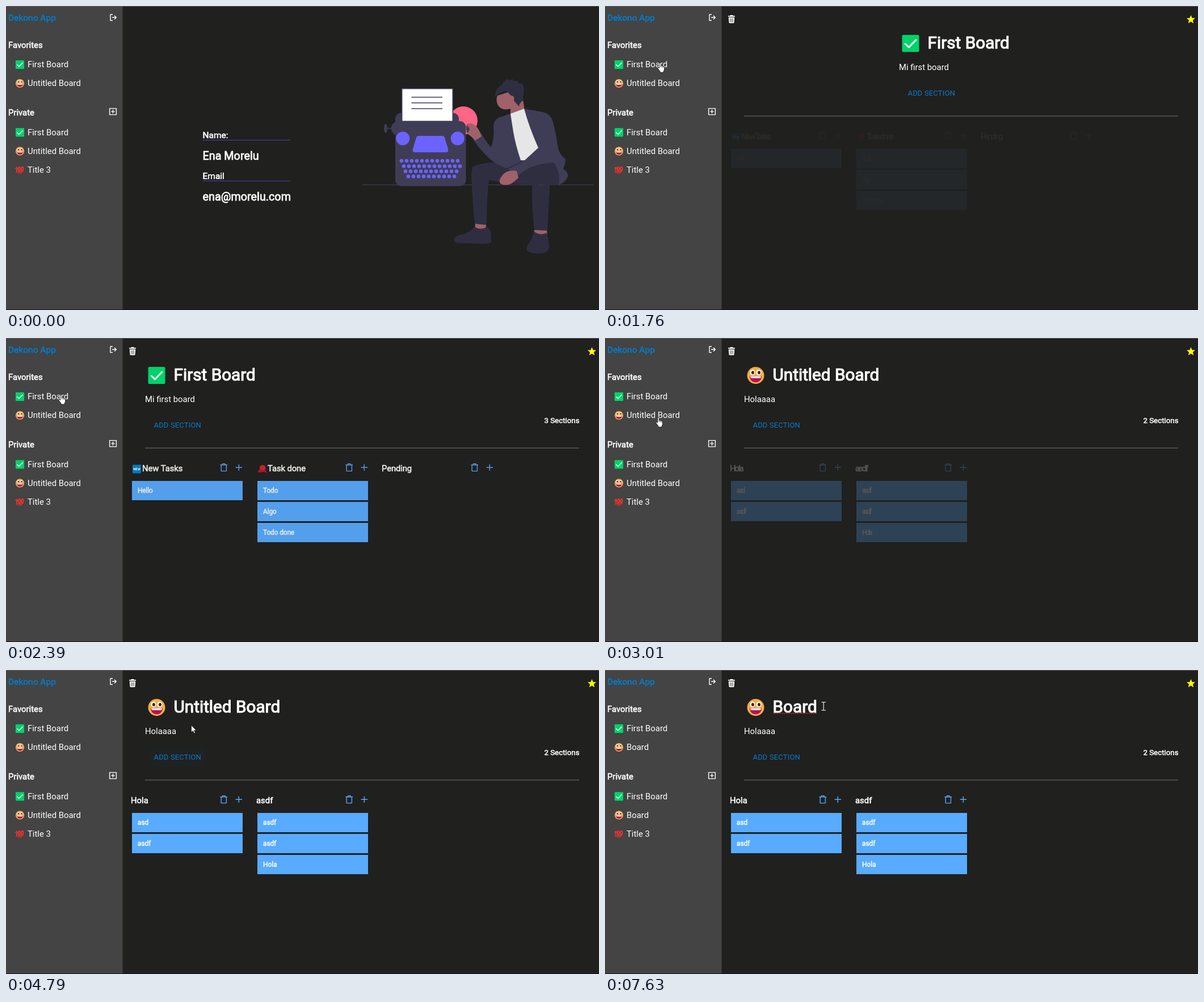
Write an HTML page with a canvas that moves like this. It is 1045 px wide and 536 px high and loops after 8 s.

```html
<!DOCTYPE html>
<html lang="en">
<head>
<meta charset="utf-8">
<title>Board app</title>
<style>
html, body { margin: 0; width: 100%; height: 100%; overflow: hidden; background: #20201f; }
canvas { display: block; }
</style>
</head>
<body>
<canvas id="stage" width="1045" height="536"></canvas>
<script>
const ctx = document.getElementById('stage').getContext('2d');
const LOOP = 8000;
const BG = [32, 32, 31], WHITE = [255, 255, 255], TILE = [88, 171, 255];
const INK = '#2f2e41', COAT = '#3f3d56', SKIN = '#a0616a', VIOLET = '#6c63ff', LINK = '#087ac8';

const clamp = v => Math.max(0, Math.min(1, v));
const outQuad = p => 1 - (1 - p) ** 2;
const outCubic = p => 1 - (1 - p) ** 3;
const mix = (c, a) => `rgb(${c.map((v, i) => Math.round(BG[i] + (v - BG[i]) * a))})`;

function text(s, x, y, size, { bold = false, color = '#fff', align = 'left', gap = 0 } = {}) {
  ctx.font = `400 ${size}px Roboto, sans-serif`;
  ctx.textAlign = align;
  ctx.letterSpacing = gap + 'px';
  ctx.fillStyle = ctx.strokeStyle = color;
  ctx.fillText(s, x, y);
  if (bold) {
    ctx.lineWidth = size / 26;
    ctx.lineJoin = 'round';
    ctx.strokeText(s, x, y);
  }
  ctx.letterSpacing = '0px';
}

function rect(x, y, w, h, color, r = 0) {
  ctx.fillStyle = color;
  ctx.beginPath();
  ctx.roundRect(x, y, w, h, r);
  ctx.fill();
}

function oval(x, y, rx, ry, color, turn = 0) {
  ctx.fillStyle = color;
  ctx.beginPath();
  ctx.ellipse(x, y, rx, ry, turn, 0, 7);
  ctx.fill();
}

function shape(d, color) {
  ctx.fillStyle = color;
  ctx.fill(new Path2D(d));
}

function line(d, color, width = 1) {
  ctx.strokeStyle = color;
  ctx.lineWidth = width;
  ctx.stroke(new Path2D(d));
}

function at(x, y, scale, draw) {
  ctx.save();
  ctx.translate(x, y);
  ctx.scale(scale, scale);
  draw();
  ctx.restore();
}

// Emoji are drawn inside a box from -1 to 1
const emoji = {
  check() {
    rect(-1, -1, 2, 2, '#00d26a', .14);
    ctx.lineCap = ctx.lineJoin = 'round';
    line('M-.62 .05L-.2 .45L.62 -.4', '#fff', .2);
    ctx.lineCap = 'butt';
  },
  grin() {
    oval(0, 0, 1, 1, '#f8ad3d');
    for (const x of [-.37, .37]) {
      oval(x, -.35, .3, .34, '#fff');
      oval(x + .03, -.34, .17, .2, '#40232b');
    }
    shape('M-.7 .08H.7C.68 .55 .4 .8 0 .8S-.68 .55 -.7 .08Z', '#b4125c');
    shape('M-.64 .1H.64L.56 .32H-.56Z', '#fff');
  },
  hundred() {
    ctx.lineCap = 'round';
    const red = '#f8312f';
    line('M-.95 -.35L-.62 -.55L-.75 .3', red, .25);
    for (const x of [-.13, .57]) {
      ctx.lineWidth = .24;
      ctx.beginPath();
      ctx.ellipse(x, -.22, .22, .43, .2, 0, 7);
      ctx.stroke();
    }
    line('M-.85 .58Q0 .35 .8 .32M-.35 .85Q0 .72 .5 .68', red, .17);
    ctx.lineCap = 'butt';
  },
  fresh() {
    rect(-1, -1, 2, 2, '#0084ce', .14);
    line('M-.72 .25V-.25L-.38 .25V-.25M.08 -.23H-.18V.23H.08M-.18 0H.06M.26 -.25L.38 .23L.5 -.1L.62 .23L.75 -.25', '#fff', .13);
  },
  bell() {
    oval(.1, -.25, .7, .72, '#d8202f');
    shape('M-1 .45L-.5 0L.9 .3L1 .9L.4 .65L-.9 .85Z', '#b01a2e');
  }
};

const icon = {
  exit: () => line('M188 15H184V25.5H188M187 20.2H194M191 17L194.3 20.2L191 23.5', '#fff', 1.4),
  addBox: () => line('M182.6 180.6H194.4V191.6H182.6ZM188.5 182.8V189.4M185.2 186.1H191.8', '#fff', 1.4),
  bin() {
    rect(217, 17.3, 12, 1.8, '#fff', .6);
    rect(220.5, 16, 5, 2, '#fff', .8);
    shape('M217.8 20H228.2L227.5 29Q227.4 30.2 226.3 30.2H219.7Q218.6 30.2 218.5 29Z', '#fff');
    line('M220.8 21.6V28.5M223 21.6V28.5M225.2 21.6V28.5', '#20201f', .8);
  },
  star() {
    ctx.beginPath();
    for (let i = 0; i < 10; i++) {
      const r = i % 2 ? 3.5 : 8, a = i * Math.PI / 5 - Math.PI / 2;
      ctx.lineTo(1032.5 + r * Math.cos(a), 24 + r * Math.sin(a));
    }
    ctx.fillStyle = '#ffff00';
    ctx.fill();
  }
};

function sidebar(boardName) {
  rect(0, 0, 205.5, 536, '#434443');
  text('Dekono App', 4, 26, 15.5, { bold: true, color: LINK });
  icon.exit();
  text('Favorites', 4, 74, 14.87, { bold: true });
  text('Private', 4, 193.3, 14.87, { bold: true });
  icon.addBox();
  const items = [['check', 'First Board', 103], ['grin', boardName, 136],
    ['check', 'First Board', 222.5], ['grin', boardName, 255.5], ['hundred', 'Title 3', 288.5]];
  for (const [face, name, y] of items) {
    at(24.5, y + .3, 7.6, emoji[face]);
    text(name, 38, y + 5.3, 14.87);
  }
}

function typewriter() {
  line('M628 315.3H1036', COAT, 1.3);
  oval(806, 202, 25, 25, '#ff6584');
  rect(686, 188.5, 112, 34, COAT, 10);
  rect(679, 204, 127, 23.5, COAT, 11);
  line('M669 215.8H684', COAT, 2);
  oval(669, 215.8, 3, 8, COAT);
  rect(686, 203, 124.5, 114.5, COAT, 11);
  rect(697, 145, 91, 59, COAT);
  rect(698.5, 146.5, 88, 56, '#fff');
  line('M714.5 160.7H769M714.5 170.8H769M714.5 181H769', COAT, 1.5);
  oval(699.3, 233.5, 12, 12, VIOLET);
  oval(795.8, 233.5, 12, 12, VIOLET);
  shape('M727 229H769Q772 229 773 232L779 252Q780.5 258 775 258H721Q715.500 258 717 252L723 232Q724 229 727 229Z', VIOLET);
  for (const [x, y, n] of [[697, 273, 12], [701, 282.5, 12], [704, 291.5, 11], [709, 300.5, 10]])
    for (let i = 0; i < n; i++) oval(x + i * 9, y, 3.3, 3.3, VIOLET);
}

function writer() {
  // Back leg and shoe
  shape('M822 284Q840 274 878 276L930 268L972 275V314H905Q870 312 851 306Q847 340 847 389L826 386Q821 330 820 296Z', INK);
  shape('M827 384L846 386L845 394H826Z', SKIN);
  shape('M826 389Q834 396 848 390Q855 394 855 404V416Q850 420 836 419L796 418Q789 417 790 409Q796 403 808 402Q818 398 826 389Z', INK);
  // Front leg and shoe
  shape('M925 285H960Q957 340 954 397L931 396Q925 340 928 300Z', INK);
  shape('M931 395L953 396L954 403H930Z', SKIN);
  shape('M930 397Q940 406 953 400Q957 414 957 427Q953 436 943 436Q924 437 917 431Q917 423 924 415Q929 406 930 397Z', INK);
  // Head
  shape('M866 158L891 150L911 165L914 184L889 193V181Q872 186 866 173Q863 165 866 158Z', SKIN);
  shape('M862 160Q862 145 875 138Q877 131 884 129L887 131L893 129L895 132L902 132L903 136L910 137Q914 143 912 152L911 167Q905 170 904 177L895 167Q897 158 890 158L882 150Q873 150 862 160Z', INK);
  // Coat, arms and shirt
  shape('M913 181L946 187Q960 190 964 205Q970 228 973 251Q976 263 986 270Q986 278 982 287Q992 294 990 301Q986 311 973 316H938L932 287L908 273Q896 281 881 286Q871 282 861 276Q842 263 823 235L836 222Q846 240 855 249Q861 232 859 212Q860 198 874 195L889 190Z', COAT);
  shape('M889 190L913 181Q922 214 938 250L914 272H907Q898 245 894 222Z', '#e6e6e6');
  shape('M857 249L863 254M952 222L938 254L917 271L885 288L896 301L935 286L960 268Z', COAT);
  shape('M974 316Q978 292 965 276Q940 277 921 286L905 296L914 312L929 314L958 316Z', INK);
  shape('M900 291Q884 288 875 298Q867 308 871 313Q879 318 891 313L903 303Z', SKIN);
  oval(814, 216, 3, 8, COAT);
  shape('M812 210Q817 204 824 209Q833 213 838 230L827 237Q820 230 813 225L818 217Z', SKIN);
}

function profile() {
  text('Name:', 346.500, 232.5, 15.5, { bold: true });
  text('Ena Morelu', 346.5, 270.5, 19.8, { bold: true });
  text('Email', 346.5, 305, 15.5, { bold: true });
  text('ena@morelu.com', 346.5, 343, 19.8, { bold: true });
  rect(347, 236, 154, 1, '#4a45a6');
  rect(347, 308, 154, 1, '#4a45a6');
  typewriter();
  writer();
}

const boards = {
  first: {
    face: 'check', about: 'Mi first board',
    columns: [['New Tasks', 'fresh', ['Hello']], ['Task done', 'bell', ['Todo', 'Algo', 'Todo done']], ['Pending', null, []]]
  },
  second: {
    face: 'grin', about: 'Holaaaa',
    columns: [['Hola', null, ['asd', 'asdf']], ['asdf', null, ['asdf', 'asdf', 'Hola']]]
  }
};

function columns(list, age) {
  if (age <= 0) return;
  const p = clamp(age / 1000);
  const a = p < .4 ? .6 * outCubic(p / .4) : .6 + .4 * outCubic((p - .4) / .6);
  const gap = -2.5 * (1 - outCubic(p));
  const style = { bold: true, color: mix(WHITE, a), gap };
  list.forEach(([name, face, tasks], i) => {
    const x = 221 * i;
    if (face) {
      ctx.globalAlpha = a;
      at(x + 230.5, 231, 7.5, emoji[face]);
      ctx.globalAlpha = 1;
    }
    text(name, x + (face ? 240 : 220), 235.2, 14.87, style);
    ctx.save();
    ctx.translate(x, 0);
    line('M377.5 223.7H390M379.2 223.7V234.6H388.400V223.7M381.5 223V221.6H386V223', mix(TILE, a), 1.4);
    line('M404.7 228.3H416M410.3 222.7V234', mix(TILE, a), 1.4);
    ctx.restore();
    tasks.forEach((task, j) => {
      rect(x + 222, 252 + 37 * j, 195, 34, mix(TILE, a));
      text(task, x + 232, 273.3 + 37 * j, 11.9, style);
    });
  });
}

function boardView(t, title) {
  const isFirst = t < 2940, board = isFirst ? boards.first : boards.second;
  const selected = t >= 5350 && t < 6430;
  const slide = 1000 * (1 - outQuad(clamp((t - 1570) / 400)));
  icon.bin();
  icon.star();
  rect(245, 193.5, 765, 1, '#747473');

  ctx.save();
  ctx.translate(slide, 0);
  at(265.5, 66, 15, emoji[board.face]);
  if (selected) rect(296, 47, 187, 36, '#3390ff');
  text(isFirst ? 'First Board' : title, 295.5, 75, 29.73, { bold: true });
  if (t >= 6430 && t < 7630) rect(Math.round(295.5 + ctx.measureText(title).width) - 1, 47, 1, 36, '#fff');
  if (t >= 7160) {
    let d = 'M296 76.5';
    for (let x = 298; x <= 374; x += 2) d += `L${x} ${x % 4 ? 75.7 : 77}`;
    line(d, '#d02a2a', 1);
  }
  text(board.about, 245, 113.2, 14.87);
  const hover = clamp((t - 4150) / 250) - clamp((t - 4660) / 250);
  if (hover > 0) rect(254, 136, 97, 34, `rgba(25,118,210,${.05 * hover})`, 4);
  text('ADD SECTION', 260.5, 157.5, 13, { color: LINK, gap: .16 });
  text(`${isFirst ? 3 : 2} Sections`, 1010.5, 150, 13.3, { bold: true, align: 'right' });
  ctx.restore();

  columns(board.columns, t - (isFirst ? 1750 : 2946));
}

const pointers = {
  arrow: 'M.5 .5V13L3.4 10.3L5.4 14.7L7.4 13.8L5.5 9.5H9.4Z',
  hand: 'M3.8 1.8Q5 .2 6.3 1.8V6.300Q7.500 5.300 8.5 6.800Q9.800 6 10.500 7.400Q12.300 7 12.500 9V12.500Q12.300 15 11 16.500V18H5V16.500Q3.500 14 1 11Q.3 9.200 1.800 9L3.800 10.500Z'
};

// time, x, y, shape of the pointer from then on
const path = [
  [110, 829, 505, 'arrow'], [180, 400, 440, 'arrow'], [250, 0, 380, 'arrow'], [450, 0, 378, 'arrow'],
  [590, 18, 220, 'arrow'], [730, 44, 84, 'hand'], [870, 46, 88, 'hand'], [1250, 92, 99, 'hand'],
  [2460, 92, 99, 'hand'], [2740, 89, 139, 'hand'], [3640, 89, 139, 'hand'], [3780, 150, 142, 'arrow'],
  [4100, 322, 148, 'hand'], [4640, 322, 148, 'arrow'], [4790, 326, 97, 'arrow'], [4920, 330, 92, 'arrow'],
  [5060, 352, 70, 'beam'], [5280, 381, 56, 'beam']
];

function pointer(t) {
  const i = path.findLastIndex(k => k[0] <= t);
  if (i < 0) return;
  const [t0, x0, y0, kind] = path[i], [t1, x1, y1] = path[i + 1] || [LOOP, x0, y0];
  const p = (t - t0) / (t1 - t0);
  ctx.save();
  ctx.translate(x0 + (x1 - x0) * p, y0 + (y1 - y0) * p);
  if (kind === 'beam') {
    line('M.5 .8H3.2L4.2 1.5L5.2 .8H8M.5 15H3.2L4.2 14.300L5.2 15H8M4.2 1.500V14.300', '#fff', 1.1);
  } else {
    shape(pointers[kind], '#fff');
    line(pointers[kind], '#111', .8);
    if (kind === 'hand') line('M6.300 6V9M8.500 7V9.500M10.500 7.500V10', '#222', .7);
  }
  ctx.restore();
}

const typing = [[0, 'Untitled Board'], [6430, 'B'], [6690, 'Bo'], [6820, 'Boar'], [7020, 'Board'], [7160, 'Board ']];

function render(t) {
  const title = typing.findLast(k => k[0] <= t)[1];
  rect(0, 0, 1045, 536, mix(WHITE, 0));
  if (t < 1600) profile();
  else boardView(t, title);
  sidebar(title);
  rect(0, 0, 1045, 1, '#5c5c5d');
  rect(0, 535, 1045, 1, '#1b1217');
  pointer(t);
}

const start = performance.now();
function tick() {
  render((performance.now() - start) % LOOP);
  requestAnimationFrame(tick);
}
tick();
</script>
</body>
</html>
```
